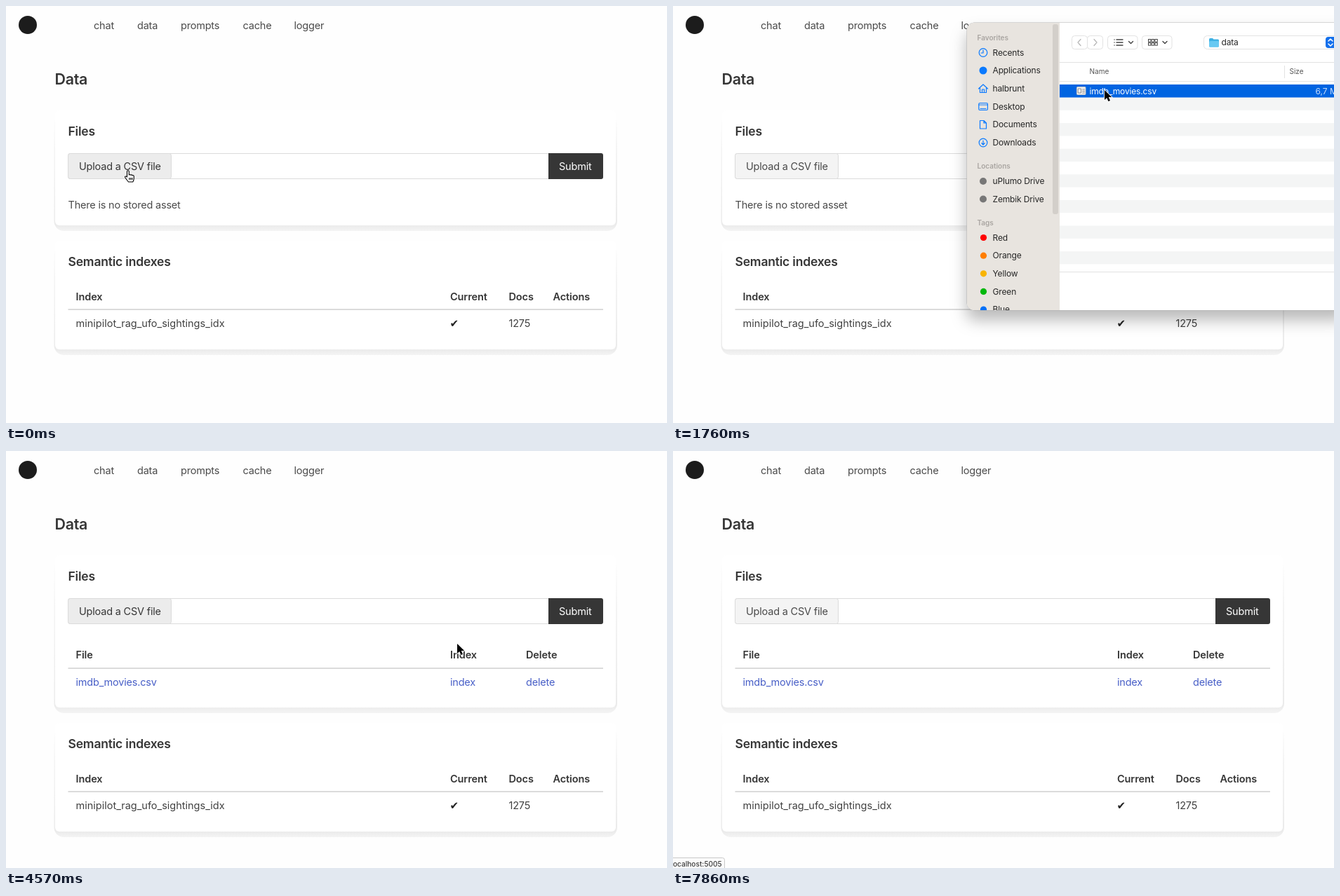
These frames come from a looping animation (942 px wide and 595 px high, 8000 ms). An HTML page:

```html
<!DOCTYPE html>
<html lang="en">
<head>
<meta charset="utf-8">
<title>Data page</title>
<style>
html, body { margin: 0; width: 100%; height: 100%; overflow: hidden; background: #fefefe; }
svg { display: block; }
text { font: 14.5px Inter, sans-serif; letter-spacing: -.2px; fill: #4a4a4a; white-space: pre; }
.h1 { font-size: 21.4px; font-weight: 600; letter-spacing: -.3px; fill: #363636; }
.h2 { font-size: 17.5px; font-weight: 600; fill: #363636; }
.th { font-weight: 600; letter-spacing: -.1px; fill: #363636; }
.td { fill: #404040; }
.long { fill: #404040; letter-spacing: 0; }
.check { font: 15px "DejaVu Sans", sans-serif; fill: #222; }
.link { fill: #485fc7; }
.white { fill: #fff; }
.side { font-size: 12px; letter-spacing: -.15px; fill: #262626; }
.group { font-size: 10px; font-weight: 600; letter-spacing: 0; fill: #a9a5a1; }
.col { font-size: 10px; letter-spacing: 0; fill: #555; }
.size { font-size: 12px; letter-spacing: 0; fill: #808080; }
.status { font-size: 10.1px; font-weight: 500; letter-spacing: 0; fill: #3c3c3c; }
.icon { fill: none; stroke: #0a7aff; stroke-width: 1.2; stroke-linecap: round; stroke-linejoin: round; }
.grey { stroke: #777; }
.dark { stroke: #444; stroke-width: 1.4; }
.soft { fill: #fff; stroke: #e2e2e2; }
.rule { stroke: #dbdbdb; stroke-width: 2; }
.thin { stroke: #e2e2e2; }
</style>
</head>
<body>
<script>
const text = (x, y, str, cls = '', id = '') => `<text x="${x}" y="${y}" class="${cls}" id="${id}">${str}</text>`;
const rect = (x, y, w, h, attrs) => `<rect x="${x}" y="${y}" width="${w}" height="${h}" ${attrs}/>`;
const path = (d, cls) => `<path d="${d}" class="${cls}"/>`;
const dot = (x, y, r, attrs) => `<circle cx="${x}" cy="${y}" r="${r}" ${attrs}/>`;

const card = (top, bottom) =>
  rect(68.5, top, 802.5, bottom - top + 8, 'rx="14" fill="url(#shade)"') +
  rect(70, top - 6, 799, bottom - top + 6, 'rx="6" fill="#fff"');

const nav = [[125, 'chat'], [187, 'data'], [249, 'prompts'], [337.5, 'cache'], [410.5, 'logger']];

const files = `
  <g id="empty">${card(155, 313)}${text(88.5, 289, 'There is no stored asset')}</g>
  <g id="list">${card(155, 366)}
    ${text(99.5, 296, 'File', 'th')}${text(633, 296, 'Index', 'th')}${text(741, 296, 'Delete', 'th')}
    ${path('M88.5 310H851', 'rule')}
    ${text(99.5, 334.7, 'imdb_movies.csv', 'link')}${text(633, 334.7, 'index', 'link', 'indexLink')}
    ${text(741, 334.7, 'delete', 'link')}
  </g>
  ${text(88.5, 184.5, 'Files', 'h2')}
  ${rect(88.5, 210.5, 700, 36, 'rx="3" fill="#fff" stroke="#dbdbdb"')}
  ${rect(88.5, 210.5, 147, 36, 'rx="3" stroke="#dbdbdb" id="upload"')}
  ${text(104, 234, 'Upload a CSV file', '', 'uploadText')}
  ${rect(771.5, 208.5, 80.5, 39.5, 'rx="4" fill="#c9c9c9" id="ring"')}
  ${path('M773 210h75a3 3 0 0 1 3 3v31a3 3 0 0 1-3 3h-75z" id="submit', '')}
  ${text(788, 234, 'Submit', 'white')}`;

const indexes = `<g id="indexes">${card(341, 490)}
  ${text(88.5, 370.5, 'Semantic indexes', 'h2')}
  ${text(99.5, 419.5, 'Index', 'th')}${text(633, 419.5, 'Current', 'th')}
  ${text(716.5, 419.5, 'Docs', 'th')}${text(779.5, 419.5, 'Actions', 'th')}
  ${path('M88.5 433H851', 'rule')}
  ${text(99.5, 458, 'minipilot_rag_ufo_sightings_idx', 'long')}
  ${text(632.5, 458, '✔', 'check')}${text(716.5, 458, '1275', 'td')}</g>`;

const favorites = ['Recents', 'Applications', 'halbrunt', 'Desktop', 'Documents', 'Downloads'];
const tags = [['Red', '#f00'], ['Orange', '#ff7d00'], ['Yellow', '#f8b400'], ['Green', '#00b80c'], ['Blue', '#0070f8']];
const sideRow = y => (name, i) => text(455.5, y + 4.3 + i * 25.65, name, 'side');

const sidebar = `
  ${path('M551 24H429a10 10 0 0 0-10 10V424a10 10 0 0 0 10 10H551z" fill="#e8e4df', '')}
  ${rect(541, 26, 8, 271, 'rx="3" fill="#d3cfca"')}
  ${text(433.5, 48.5, 'Favorites', 'group')}${favorites.map(sideRow(66.5)).join('')}
  ${text(433.5, 232, 'Locations', 'group')}${['uPlumo Drive', 'Zembik Drive'].map(sideRow(250)).join('')}
  ${text(433.5, 312.5, 'Tags', 'group')}
  ${tags.map(([name, color], i) => dot(442.5, 330.5 + i * 25.65, 4.6, `fill="${color}"`) + sideRow(330.5)(name, i)).join('')}
  ${dot(442, 66.5, 5.8, 'class="icon"')}${path('M442 63v4h-3', 'icon')}
  ${dot(442, 92, 5.5, 'fill="#0a7aff"')}
  ${path('M435.5 118l6.5-6 6.5 6M437.5 117v6.5h9v-6.500M440.500 123v-4h3v4', 'icon')}
  ${rect(435.8, 138.5, 12.6, 10, 'rx="1.5" class="icon"')}${path('M436 141h12M438 146.500h8', 'icon')}
  ${path('M437.500 163.500h5.500l3.500 3.500v8h-9zM443 163.500v3.500h3.500', 'icon')}
  ${dot(442, 195, 5.8, 'class="icon"')}${path('M442 192v6m-2.300-2.300l2.300 2.300 2.300-2.300', 'icon')}
  ${dot(442, 250, 5, 'fill="#777"')}${dot(442, 275.5, 5, 'fill="#777"')}`;

const stripes = Array.from({ length: 7 }, (_, i) => rect(551, 130.5 + 36.6 * i, 391, 18.3, 'fill="#f4f5f5"')).join('');
const grid = [0, 1, 2].map(i => [0, 1].map(j => rect(677.5 + i * 4.7, 47.5 + j * 5, 3.4, 3.6, 'fill="none" stroke="#444"')).join('')).join('');

const dialog = `<g id="dialog">
  ${rect(419, 24, 540, 410, 'rx="10" fill="#fff" stroke="#b0b0b0" style="filter:drop-shadow(0 14px 11px rgba(0,0,0,.27))"')}
  <svg x="419" y="24" width="523" height="410" viewBox="419 24 523 410">
    ${rect(419, 24, 540, 410, 'rx="10" fill="#fff"')}${sidebar}
    ${rect(568.5, 42.5, 22, 19, 'rx="4" class="soft"')}${rect(590.5, 42.5, 22, 19, 'rx="4" class="soft"')}
    ${path('M581 47.500l-4 4.500 4 4.500M600 47.500l4 4.500-4 4.500', 'icon grey" opacity=".55')}
    ${rect(619.5, 42.5, 42.5, 19, 'rx="4" class="soft"')}${rect(668.5, 42.5, 42.5, 19, 'rx="4" class="soft"')}
    ${path('M629 48h.1M629 52h.1M629 56h.1M632 48h9M632 52h9M632 56h9M649.500 50.500l3 3 3-3M698 50.500l3 3 3-3', 'icon dark')}${grid}
    ${rect(756.5, 42.5, 200, 19, 'rx="5" class="soft"')}
    ${path('M764 47.500q0-1.500 1.500-1.500h3.500l1.500 1.500h6q1.500 0 1.500 1.500v8q0 1.500-1.500 1.500h-11q-1.500 0-1.500-1.500z" fill="#3eb1e4', '')}
    ${rect(764, 50, 14, 8.5, 'rx="1.5" fill="#68c9f2"')}${text(781.5, 56, 'data', 'side')}
    ${rect(930, 44, 18, 16, 'rx="4" fill="#1470ec"')}
    ${path('M934 50l3-3 3 3M934 54l3 3 3-3', 'icon" style="stroke:#fff;stroke-width:1.500')}
    ${path('M551 80.500H942M551 107.500H942M871.500 85V103M551 379.500H942', 'thin')}
    ${text(593.5, 97.3, 'Name', 'col')}${text(878.5, 97.3, 'Size', 'col')}
    ${stripes}${rect(551, 112, 391, 18.5, 'fill="#0064e1" id="selection"')}
    ${rect(575.5, 115.5, 12.5, 11, 'rx="1" fill="#f0f0f0" stroke="#c4c4c4"')}
    ${path('M577.500 118h4v6h-4zM583.500 119h3M583.500 121.500h3M583.500 124h3', 'icon grey" style="stroke-width:.8')}
    ${text(593.5, 125.6, 'imdb_movies.csv', 'side', 'fileName')}${text(915.5, 125.6, '6,7 MB', 'size', 'fileSize')}
  </svg></g>`;

const cursors = `<g id="cursor">
  <path id="arrow" d="M0 0V14l3.200-3 2.200 5 2.600-1.100-2.200-4.900h4.400z" fill="#000" stroke="#fff" stroke-width="1.600" paint-order="stroke"/>
  <g id="hand" stroke="#000" stroke-width="1.100" stroke-linejoin="round">
    <path d="M-1.500 9V1.200a1.400 1.400 0 0 1 2.800 0V6q1.200-1 2.400.2 1.400-.8 2.400.500 2-.6 2.200 1.400V11q0 2.500-1.500 5H.5Q-2 13-4 10q-1-1.800.4-2 1-.2 2.100 1z" fill="#fff"/>
    <path d="M1.800 10v3M3.800 10v3M5.800 10v3" fill="none"/>
  </g></g>`;

document.body.innerHTML = `<svg width="942" height="595" viewBox="0 0 942 595">
  <defs><linearGradient id="shade" x2="0" y2="1">
    <stop stop-color="#fefefe"/><stop offset=".3" stop-color="#f4f4f4"/>
    <stop offset=".95" stop-color="#ebebeb"/><stop offset="1" stop-color="#f4f4f4"/>
  </linearGradient></defs>
  ${dot(31, 27, 13, 'fill="#1c1c1c"')}
  ${nav.map(([x, name]) => text(x, 32.5, name)).join('')}
  ${text(69.5, 112, 'Data', 'h1')}
  ${files}${indexes}${dialog}
  <g id="status">${rect(-5, 580.5, 0, 20, 'rx="3" fill="#fbfbfb" stroke="#c9c9c9" id="bubble"')}${text(0, 592.7, '', 'status', 'url')}</g>
  ${cursors}</svg>`;

const LOOP = 8000, STEP = 146;
const $ = id => document.getElementById(id);
const show = (id, on) => $(id).style.display = on ? '' : 'none';
const fill = (id, color) => $(id).style.fill = color;

// Pointer moves: start time, number of steps, end point.
const moves = [
  [0, 1, 174, 235], [300, 1, 174, 233], [450, 7, 543, 277], [1620, 1, 600, 165], [1760, 1, 615, 120],
  [2660, 4, 806, 238], [3410, 1, 809, 226], [4570, 1, 643, 275], [4720, 6, 652, 334],
  [5620, 8, 653, 332], [7110, 5, 20, 95], [7860, 1, -40, 90]
];
// Status bubble: start time, width, address.
const address = 'ocalhost:5005/data/work?id=308aa4dfe61a217a6843';
const bubbles = [
  [0, 0, ''], [3410, 215, 'ocalhost'], [3680, 0, ''], [5620, 215, address.slice(0, 37) + '…'],
  [6810, 262, address], [7110, 73.5, 'ocalhost:5005']
];

function pointer(t) {
  let x = 174, y = 235;
  for (const [start, steps, toX, toY] of moves) {
    if (t < start) break;
    const k = Math.min(1, (Math.floor((t - start) / STEP) + 1) / steps);
    x += (toX - x) * k;
    y += (toY - y) * k;
  }
  return [x, y];
}

function render(t) {
  const between = (a, b) => t >= a && t < b;
  const [x, y] = pointer(t);
  const open = between(300, 2210), listed = t >= 3820, selected = t >= 1760;
  const overSubmit = !open && x > 773 && x < 851 && y > 210 && y < 247;
  const overLink = listed && x > 633 && x < 669 && y > 321 && y < 341;
  const overUpload = t < 1000 || between(2660, 2810) || between(3680, 4720);

  show('empty', !listed);
  show('list', listed);
  $('indexes').setAttribute('transform', `translate(0 ${listed ? 53 : 0})`);
  show('dialog', open);
  show('selection', selected);
  fill('fileName', selected ? '#fff' : '#262626');
  fill('fileSize', selected ? '#c9dcfa' : '#808080');
  fill('upload', overUpload ? '#ececec' : '#f4f4f4');
  fill('uploadText', overUpload ? '#363636' : '#4a4a4a');
  fill('submit', overSubmit ? '#2f2f2f' : '#363636');
  fill('indexLink', overLink ? '#363636' : '#485fc7');
  show('ring', between(3410, 3820));

  const [, width, url] = bubbles.findLast(b => t >= b[0]);
  show('status', width);
  $('bubble').setAttribute('width', width + 5);
  $('url').textContent = url;

  const hand = t < 300 || overSubmit || overLink;
  show('hand', hand);
  show('arrow', !hand);
  $('cursor').setAttribute('transform', `translate(${x} ${y})`);
}

const begin = performance.now();
(function tick() {
  render((performance.now() - begin) % LOOP);
  requestAnimationFrame(tick);
})();
</script>
</body>
</html>
```
